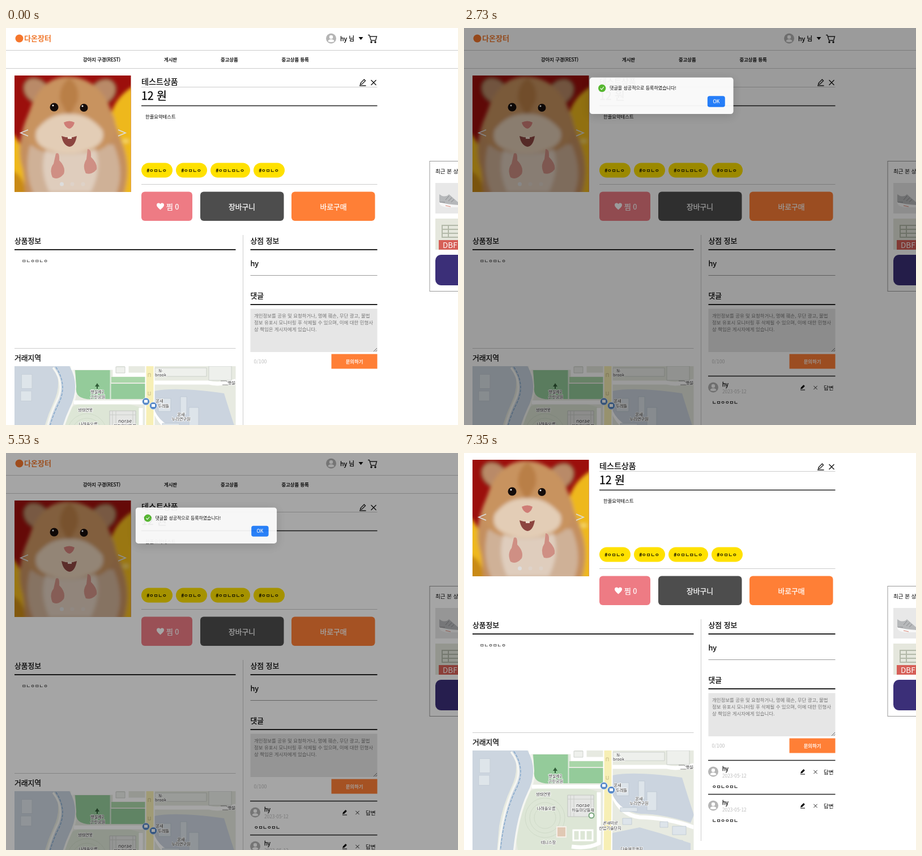
An HTML page that plays this animation: 798 by 702 pixels, repeating every 8000 ms.

```html
<!DOCTYPE html>
<html lang="ko">
<head>
<meta charset="utf-8">
<title>상품 상세</title>
<style>
html,body{margin:0;width:100%;height:100%;overflow:hidden;background:#fff}
svg{display:block;width:798px;height:702px}
text{font-family:"Noto Sans CJK KR","Noto Sans CJK JP","Noto Sans",sans-serif;white-space:pre}
.s{font-size:8.32px}
.p{font-size:8.45px}
.m{font-size:9.6px}
.l{font-size:12.8px}
.b{font-weight:500;stroke:#000;stroke-width:.25}
.w{fill:#fff;stroke:#fff}
.mid{text-anchor:middle}
.ln{fill:none;stroke:#222;stroke-width:1.4}
.thin{stroke:#ccc;stroke-width:1}
.map text{font-size:7.2px;text-anchor:middle;fill:#333;stroke:#fff;stroke-width:1.6;paint-order:stroke}
</style>
</head>
<body>
<svg viewBox="0 0 798 702">
<defs>
  <clipPath id="photo"><rect x="15" y="84" width="205.500" height="206"/></clipPath>
  <clipPath id="mapBox"><rect x="15" y="526" width="390.500" height="180"/></clipPath>
  <filter id="soft" x="-10%" y="-10%" width="120%" height="120%"><feGaussianBlur stdDeviation="3"/></filter>
  <g id="face"><circle r="9" fill="#b5b5b5"/><circle cy="-2.500" r="3.200" fill="#fff"/><path d="M-5.500 5.200Q-5 1.500 0 1.500T5.500 5.200Q0 8 -5.500 5.200" fill="#fff"/></g>
  <path id="cross" d="M-4.500-4.500l9 9m0-9l-9 9" fill="none" stroke="#111" stroke-width="1.300"/>
  <g id="card">
    <path class="ln" d="M431 615.500H655.500"/>
    <use href="#face" x="440" y="635.500"/>
    <text class="m b" x="456" y="633.500">hy</text>
    <text class="s" x="456" y="646.300" fill="#bbb">2023-05-12</text>
    <path d="M594 638.500l1-3 4.500-4.500 2.300 2.300-4.500 4.500zM594 639.500h8v1h-8z"/>
    <use href="#cross" transform="translate(620.500 636) scale(.7)"/>
    <text class="m" x="635" y="639.500">답변</text>
  </g>
  <g id="tag"><rect width="55" height="26" rx="13" fill="#ffe100"/><text class="s b" x="9.500" y="16">#ㅇㅁㄴㅇ</text></g>
</defs>

<g id="page">
  <circle cx="23.500" cy="18.500" r="7" fill="#f5762c"/>
  <text x="32" y="23.200" font-size="13" font-weight="700" fill="#f07a30">다온장터</text>
  <use href="#face" x="574" y="18.500"/>
  <text class="b" x="590" y="23" font-size="10.800">hy 님</text>
  <path d="M622.500 16h8l-4 5z"/>
  <path class="ln" d="M639 12.500h2.500l3 9.500h8l2-7H642.500"/>
  <circle cx="645" cy="25" r="1.700"/><circle cx="652" cy="25" r="1.700"/>
  <path class="ln thin" d="M0 39.500H798M0 71.500H798"/>
  <g class="s b">
    <text x="136" y="59">강아지 구경(REST)</text><text x="279" y="59">게시판</text>
    <text x="379" y="59">중고상품</text><text x="486.500" y="59">중고상품 등록</text>
  </g>

  <g clip-path="url(#photo)">
    <path fill="#9c0f0c" d="M15 84h206v206H15z"/>
    <g filter="url(#soft)">
      <path fill="#eeb81c" d="M230 100Q196 118 186 150L170 300H230zM5 180Q28 200 36 240L50 300H5z"/>
      <path fill="#c98a18" d="M5 250Q30 255 40 300H5z"/>
      <ellipse cx="211" cy="200" rx="6" ry="3" fill="#f6dc75"/>
      <path fill="#c48f5e" d="M36 160Q16 210 30 250L36 300H206Q222 250 206 206L182 140z"/>
      <path fill="#cfb197" d="M42 208Q30 260 52 300H192Q212 256 190 206z"/>
      <g fill="#b98a68" stroke="#8f6442" stroke-width="3">
        <ellipse cx="54" cy="111" rx="25" ry="20" transform="rotate(42 54 111)"/>
        <ellipse cx="171" cy="113" rx="25" ry="20" transform="rotate(-42 171 113)"/>
      </g>
      <path fill="#c8935e" d="M112 86C76 84 52 112 42 146C24 184 36 212 72 220H152C192 210 202 180 186 148C176 114 150 88 112 86z"/>
      <path fill="#b97f47" d="M112 88Q92 104 96 130L111 158 126 130Q132 104 112 88z"/>
      <path fill="#e3cdb6" d="M106 152Q76 152 54 180Q46 206 76 216Q112 230 150 214Q178 202 170 180Q146 152 118 152z"/>
      <path fill="#dfcdbd" d="M70 216Q112 232 158 214Q170 250 150 290H76Q58 250 70 216z"/>
    </g>
    <g fill="#150d0b"><circle cx="85" cy="140" r="7.500"/><circle cx="137.500" cy="141" r="7"/></g>
    <g fill="#fff"><circle cx="83" cy="137" r="1.500"/><circle cx="135" cy="138" r="1.500"/></g>
    <path fill="#cf7d76" d="M102 167Q112 162 121 167Q119 176 112 178Q104 176 102 167z"/>
    <path fill="#8c4540" d="M98 191Q112 196 125 191Q122 209 112 210Q101 208 98 191z"/>
    <path fill="#ecdccd" d="M109 192h7v4h-7z"/>
    <path fill="#cf8f84" d="M88 222Q95 218 94 234Q106 246 102 258Q92 270 82 264Q76 250 84 240zM144 214Q151 214 150 228Q162 240 160 250Q152 260 141 257Q134 244 142 232z"/>
    <path fill="none" stroke="#dcdcdc" stroke-width="1.700" d="M39 180l-13 5.500 13 5.500M198 180l13 5.500-13 5.500"/>
    <circle cx="98.500" cy="276" r="3.500" fill="#ddd"/>
    <g fill="#ddd" opacity=".35"><circle cx="117" cy="276" r="3.500"/><circle cx="136" cy="276" r="3.500"/></g>
  </g>

  <text class="b" x="239" y="100.300" font-size="14.080">테스트상품</text>
  <path class="ln" d="M625.500 100l.8-3 6-6 2.200 2.200-6 6zM624 102h11.500"/>
  <use href="#cross" x="649" y="96.500"/>
  <text class="b" x="239" y="127" font-size="19.500">12 원</text>
  <path class="ln thin" d="M239 104.500H655.500M239 276.500H655.500"/>
  <path class="ln" d="M239 137.500H655.500"/>
  <text class="s" x="246" y="160.300">한줄요약테스트</text>
  <use href="#tag" x="239" y="238.500"/><use href="#tag" x="300" y="238.500"/><use href="#tag" x="437" y="238.500"/>
  <rect x="361" y="238.500" width="70" height="26" rx="13" fill="#ffe100"/>
  <text class="s b" x="370.500" y="254.500">#ㅇㅁㄴㅁㄴㅇ</text>
  <rect x="239" y="289.500" width="90" height="51.500" rx="6" fill="#ee7b84"/>
  <rect x="343" y="289.500" width="147.500" height="51.500" rx="6" fill="#4d4d4d"/>
  <rect x="504" y="289.500" width="147.500" height="51.500" rx="6" fill="#ff7f36"/>
  <path fill="#fff" d="M272.500 321.500C268 317.500 266 315.500 266 312.800C266 309 271 308.500 272.500 311.500C274 308.500 279 309 279 312.800C279 315.500 277 317.500 272.500 321.500z"/>
  <g class="l b w"><text x="283" y="320.500">찜 0</text><text class="mid" x="416.500" y="320.500">장바구니</text><text class="mid" x="578" y="320.500">바로구매</text></g>

  <g class="l b"><text x="15" y="381">상품정보</text><text x="431.500" y="381">상점 정보</text><text x="431.500" y="421">hy</text>
    <text x="431.500" y="477.800">댓글</text><text x="15" y="587.500">거래지역</text></g>
  <path class="ln" style="stroke-width:2" d="M15 392H405.500M431.500 392H655.500M431.500 489H655.500"/>
  <path class="ln thin" d="M418.500 366V758M15 566.500H405.500"/>
  <path class="ln thin" style="stroke:#999" d="M431.500 437.500H655.500"/>
  <text class="s" x="28" y="415">ㅁㄴㅇㅁㄴㅇ</text>

  <rect x="431.500" y="496.500" width="224" height="76.500" fill="#e6e6e6"/>
  <path d="M649 572l6-6M652.500 572l2.500-2.500" stroke="#555" stroke-width=".9"/>
  <g id="hint" class="p" fill="#757575">
    <text x="438" y="512.300">개인정보를 공유 및 요청하거나, 명예 훼손, 무단 광고, 불법</text>
    <text x="438" y="524.300">정보 유포시 모니터링 후 삭제될 수 있으며, 이에 대한 민형사</text>
    <text x="438" y="536.300">상 책임은 게시자에게 있습니다.</text>
  </g>
  <text id="typed" class="s" x="438" y="512.300"></text>
  <g id="focus">
    <rect x="431" y="496.300" width="225" height="77" rx="2" fill="none" stroke="#111" stroke-width="1.500"/>
    <path id="under" stroke="#111" stroke-width=".8" d="M-7.600 514.500H0"/>
    <path id="caret" stroke="#111" stroke-width=".8" d="M0 503.500V514.500"/>
  </g>
  <text id="count" x="437.500" y="593" font-size="8.800" fill="#bbb"></text>
  <rect x="574.500" y="576.500" width="81" height="26" fill="#ff7f36"/>
  <text class="s b w mid" x="615" y="592.700">문의하기</text>
  <g id="older"><use href="#card"/><text class="s b" x="438" y="665">ㄴㅁㅇㅇㅁㄴ</text></g>
  <g id="newer"><use href="#card"/><text class="s b" x="438" y="665">ㅇㅁㄴㅇㅁㄴ</text></g>

  <g class="map" transform="translate(0 72)"><g clip-path="url(#mapBox)">
    <path fill="#e7eae1" d="M15 526h391v180H15z"/>
    <path fill="#ccd5df" d="M15 526H85Q100 556 84 590T62 660L58 706H15z"/>
    <path fill="#dee5ea" stroke="#c0cad4" stroke-width=".7" d="M27.500 540.500h18.500v25H27.500zM26 570h19v17.500H26z"/>
    <path fill="#dde6d6" d="M112 600Q160 575 235 598V706H96Q82 650 112 600z"/>
    <g fill="none" stroke="#cfdac8"><circle cx="143" cy="645" r="19"/><circle cx="143" cy="645" r="27"/><circle cx="143" cy="645" r="35"/></g>
    <path fill="none" stroke="#f5f6f2" stroke-width="31" d="M94 520Q122 556 101 596Q80 640 74 712"/>
    <path fill="none" stroke="#c9d4e0" stroke-width="24" d="M94 520Q122 556 101 596Q80 640 74 712"/>
    <path fill="none" stroke="#85a9cc" stroke-width="1.500" stroke-dasharray="5 2" d="M84 522Q112 558 91 596Q70 640 64 706"/>
    <path fill="#94cb9a" d="M122 533H184V557H247V584H160Q120 588 124 562z"/>
    <path fill="#a9d6a8" d="M186 545H247V555H186z"/>
    <path fill="none" stroke="#dceadb" stroke-width="2" d="M184.500 533V584"/>
    <path fill="none" stroke="#fff" stroke-width="7" d="M115 529H192V541H213V526M213 541H247M120 590H247M262 555H358Q375 560 406 552M262 603Q276 640 310 644Q360 645 406 662M262 606L300 600M238 600V690Q220 700 190 696"/>
    <path fill="#eef0ec" stroke="#c4c9c3" stroke-width=".8" d="M194 527h16v11H194zM263 529h91v15H263zM358 526h40v25h-40z"/>
    <path fill="#cbd4df" d="M262 570Q300 562 385 574Q396 610 406 640L400 654Q350 638 312 638Q276 634 262 604z"/>
    <path fill="#dde4ea" stroke="#b8c3cf" stroke-width=".7" d="M308 580h11v32h-11zM269 583h22v23h-22zM323 599h17v33h-17zM276 627h30v7h-30zM280 646h16v11h-16zM320 676h18v12h-18zM368 660h24v15h-24zM346 652h14v10h-14zM366 685h20v15h-20z"/>
    <path fill="#ccd5df" d="M262 672L310 662 345 672 400 690V706H262z"/>
    <path fill="#e5e6e4" stroke="#b9bdb8" stroke-width=".8" d="M183 605h46v38h-46z"/>
    <path fill="none" stroke="#c9ccc8" d="M188 605v38M194 605v38M224 605v38M183 612h46"/>
    <path fill="#e1c8b4" stroke="#f5efe8" stroke-width="2" d="M164 661h16v18h-16z"/>
    <path fill="none" stroke="#fff" stroke-width="3" d="M193 667h34v18h-34zM204 667v18M215 667v18"/>
    <path fill="none" stroke="#fff" stroke-width="17" d="M254 520V610L253 706"/>
    <path fill="none" stroke="#f7efb5" stroke-width="13" d="M254 520V610L253 706"/>
    <path fill="none" stroke="#c8bc89" d="M251 545v-6h4v6M251 571v6h4v-6"/>
    <path fill="none" stroke="#888" d="M379 552h10l4 4h12M382 559h11"/>
    <g fill="#5688c7" stroke="#dfe9f5"><circle cx="247" cy="588.500" r="6.500"/><circle cx="260" cy="596" r="6.500"/></g>
    <path fill="#fff" d="M244 585.500h6v5h-6zM257 593h6v5h-6z"/>
    <circle cx="225" cy="641" r="4.500" fill="#fff" stroke="#79a77d" stroke-width="2"/>
    <path fill="#315e38" d="M161 556l4 6h-3v4h-2v-4h-3z"/>
    <text x="273" y="537">N-</text><text x="273" y="544">brook</text>
    <text x="161" y="574">햇살제2</text><text x="162" y="582.500">근린공원</text>
    <text x="140" y="606">생태연못</text><text x="145" y="631">나래솔오름</text>
    <text x="210" y="626" style="font-size:9px">norae</text><text x="210" y="634">하늘마당뜰채</text>
    <text x="271" y="590">온새</text><text x="278" y="598.500">두레뜰</text>
    <text x="309" y="613.500">온새</text><text x="309" y="622">누리연구원</text>
    <text x="258" y="657" font-style="italic">온새미르</text><text x="258" y="666">산업기술단지</text>
    <text x="149" y="691">테니스장</text><text x="296" y="703">다솜에프앤지</text><text x="398" y="558">햇살</text>
  </g></g>
</g>

<g>
  <rect x="748" y="235.500" width="70" height="230" fill="#fff" stroke="#999"/>
  <text class="m" x="758" y="256.500">최근 본 상품</text>
  <path fill="#e8e8e8" d="M758 274h40v54h-40z"/>
  <path fill="#b6b8ba" d="M765 294l5 3q8 2 12-3l16 14v7h-8l-25-6z"/>
  <path fill="#f7f7f7" d="M765 308q14 4 33 5v4h-20q-14-2-13-9z"/>
  <path fill="none" stroke="#88898c" d="M776 304l6-7M781 306l6-6M786 308l5-5M766 308h9"/>
  <path fill="none" stroke="#d98272" d="M776 314l9 2"/>
  <path fill="#e5e7dd" d="M758 337h40v55h-40z"/>
  <path fill="none" stroke="#b3b9a9" stroke-width="2" d="M798 349H770V370H798M770 356H798M770 363H798M781 349V370"/>
  <path fill="#d65f57" d="M764 375h34v17h-34z"/>
  <text x="771" y="388.500" font-size="13.500" fill="#fff">DBF</text>
  <rect x="758" y="401" width="54" height="54" rx="10" fill="#3b2f78"/>
</g>

<rect id="mask" width="798" height="702"/>
<g id="modal">
  <rect x="202" y="62" width="266.500" height="68" rx="5" fill="#fff" style="filter:drop-shadow(0 4px 9px rgba(0,0,0,.16))"/>
  <circle cx="225" cy="82" r="7" fill="#52b92a"/>
  <path d="M221.800 82l2.400 2.500 4-5" fill="none" stroke="#fff" stroke-width="1.200"/>
  <text class="p" x="239" y="85.200">댓글을 성공적으로 등록하였습니다!</text>
  <rect x="420.500" y="96.500" width="32.500" height="20.500" rx="4" fill="#1f7dff"/>
  <text class="w mid" stroke-width=".2" x="436.800" y="110" font-size="8.960">OK</text>
</g>
</svg>
<script>
const LOOP = 8000, ORIGIN = [616, 592], ADVANCE = 7.65;
const el = id => document.getElementById(id);
const show = (id, on) => el(id).style.display = on ? '' : 'none';
const clamp = v => Math.max(0, Math.min(1, v));

function bezier(x1, y1, x2, y2) {
  const at = (a, b, s) => 3 * (1 - s) ** 2 * s * a + 3 * (1 - s) * s * s * b + s ** 3;
  return x => {
    let lo = 0, hi = 1;
    for (let i = 0; i < 24; i++) {
      const s = (lo + hi) / 2;
      at(x1, x2, s) < x ? lo = s : hi = s;
    }
    return at(y1, y2, lo);
  };
}
const easeOut = bezier(.08, .82, .17, 1), easeInOut = bezier(.78, .14, .15, .86);

// keys: [time, characters typed so far]
const posts = [
  {text: 'ㄴㅁㅇㅇㅁㄴ', focus: 980, blur: 2450, open: 2600, close: 3705, keys: [[1540, 2], [1680, 4], [1820, 5], [1890, 6]]},
  {text: 'ㅇㅁㄴㅇㅁㄴ', focus: 4270, blur: 5250, open: 5417, close: 6405, keys: [[4550, 1], [4620, 2], [4690, 3], [4830, 4], [4900, 5], [4970, 6]]}
];
const sent = (post, t) => t >= post.open - 27;

function drawForm(t) {
  const post = sent(posts[0], t) ? posts[1] : posts[0];
  const n = sent(post, t) ? 0 : post.keys.reduce((n, [at, k]) => t >= at ? k : n, 0);
  const end = `translate(${438 + n * ADVANCE} 0)`;
  el('typed').textContent = post.text.slice(0, n);
  el('count').textContent = n + '/100';
  show('hint', !n);
  show('focus', t >= post.focus && t < post.blur);
  show('under', n);
  el('under').setAttribute('transform', end);
  el('caret').setAttribute('transform', end);
  show('older', sent(posts[0], t));
  show('newer', sent(posts[1], t));
  el('older').setAttribute('transform', `translate(0 ${sent(posts[1], t) ? 60 : 0})`);
}

function drawModal(t) {
  const post = posts.find(p => t > p.open - 35 && t < p.close + 300);
  show('mask', post);
  show('modal', post);
  if (!post) return;
  const leave = clamp((t - post.close) / 300);
  const shown = leave ? 1 - easeInOut(leave) : easeOut(clamp((t - post.open) / 300));
  const shade = leave ? 1 - leave : clamp((t - post.open + 35) / 190);
  const scale = .2 + .8 * shown, [x, y] = ORIGIN;
  el('mask').setAttribute('opacity', .45 * shade);
  el('modal').setAttribute('opacity', shown);
  el('modal').setAttribute('transform', `translate(${x} ${y}) scale(${scale}) translate(${-x} ${-y})`);
}

function draw(t) {
  drawForm(t);
  drawModal(t);
  const scroll = 72 * Math.sin(clamp((t - 7050) / 290) * Math.PI / 2);
  el('page').setAttribute('transform', `translate(0 ${-scroll})`);
}

const start = performance.now();
function tick() {
  draw((performance.now() - start) % LOOP);
  requestAnimationFrame(tick);
}
tick();
</script>
</body>
</html>
```
